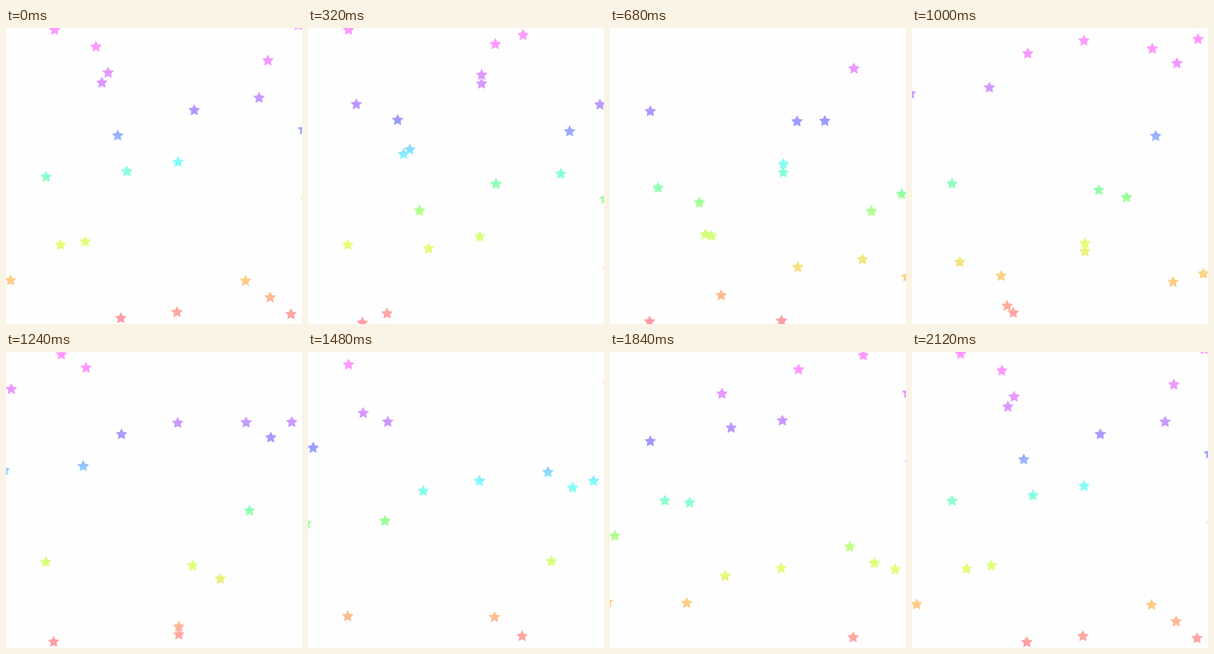
Animation, 480 px wide and 480 px high, one loop 2.16 s. Source, as an HTML page with a canvas:

```html
<!DOCTYPE html>
<html lang="en">
<head>
<meta charset="utf-8">
<title>Falling stars</title>
<style>
  html, body { margin: 0; width: 100%; height: 100%; overflow: hidden; background: #fefefe; }
  canvas { display: block; width: 480px; height: 480px; }
</style>
</head>
<body>
<canvas id="sky" width="480" height="480"></canvas>
<script>
const SIZE = 480, MID = 240.4;
const STEP = 40, LOOP = 2160, CYCLE = 2120;
const RADIUS = 10, INNER = 5, DRIFT = -0.0035;
const SLOWEST = 0.336, FASTEST = 0.403; // px per ms

// where and when (ms) each star crosses mid height, slowest star first
const crossings = [
  [389, 1615], [429, 1540], [395, 1190], [65, 2117], [303, 935],
  [482, 216], [487, 2012], [-3, 1376], [424, 522], [155, 419],
  [129, 1829], [65, 967], [125, 1389], [145, 565], [305, 286],
  [78, 630], [279, 61], [181, 173], [187, 1519], [410, 330],
  [348, 911], [165, 431], [196, 20], [278, 1559], [89, 1838],
  [8, 1694], [463, 1558], [281, 695], [281, 729], [473, 608]
];

// the rainbow is fixed to the stage; stars reveal it as they fall
const rainbow = {
  30: '#ff99ff', 111: '#cc99ff', 150: '#9c99ff', 174: '#99b0ff', 214: '#80ffff',
  275: '#99ff99', 350: '#e4ff77', 410: '#ffcc88', 480: '#ff99aa'
};

const ctx = document.getElementById('sky').getContext('2d');
const paint = ctx.createLinearGradient(0, 0, 0, SIZE);
for (const y in rainbow) paint.addColorStop(y / SIZE, rainbow[y]);

const mod = (a, n) => ((a % n) + n) % n;

// speeds spread over the range, with a soft ease towards the fast end
function speedOf(rank) {
  const u = rank / (crossings.length - 1);
  return SLOWEST + (FASTEST - SLOWEST) * (u + 0.35 * u * (1 - u));
}

function drawStar(x, y) {
  ctx.beginPath();
  for (let i = 0; i < 10; i++) {
    const r = i % 2 ? INNER : RADIUS;
    const a = i * Math.PI / 5;
    ctx.lineTo(x + r * Math.sin(a), y - r * Math.cos(a));
  }
  ctx.fill();
}

function draw(ms) {
  const t = Math.floor(mod(ms, LOOP) / STEP) * STEP;
  ctx.fillStyle = '#fefefe';
  ctx.fillRect(0, 0, SIZE, SIZE);
  ctx.fillStyle = paint;
  crossings.forEach(([x, when], rank) => {
    const since = mod(t - when + CYCLE / 2, CYCLE) - CYCLE / 2;
    const fall = since * speedOf(rank);
    drawStar(x + fall * DRIFT, MID + fall);
  });
}

const start = performance.now();
function tick() {
  draw(performance.now() - start);
  requestAnimationFrame(tick);
}
tick();
</script>
</body>
</html>
```
